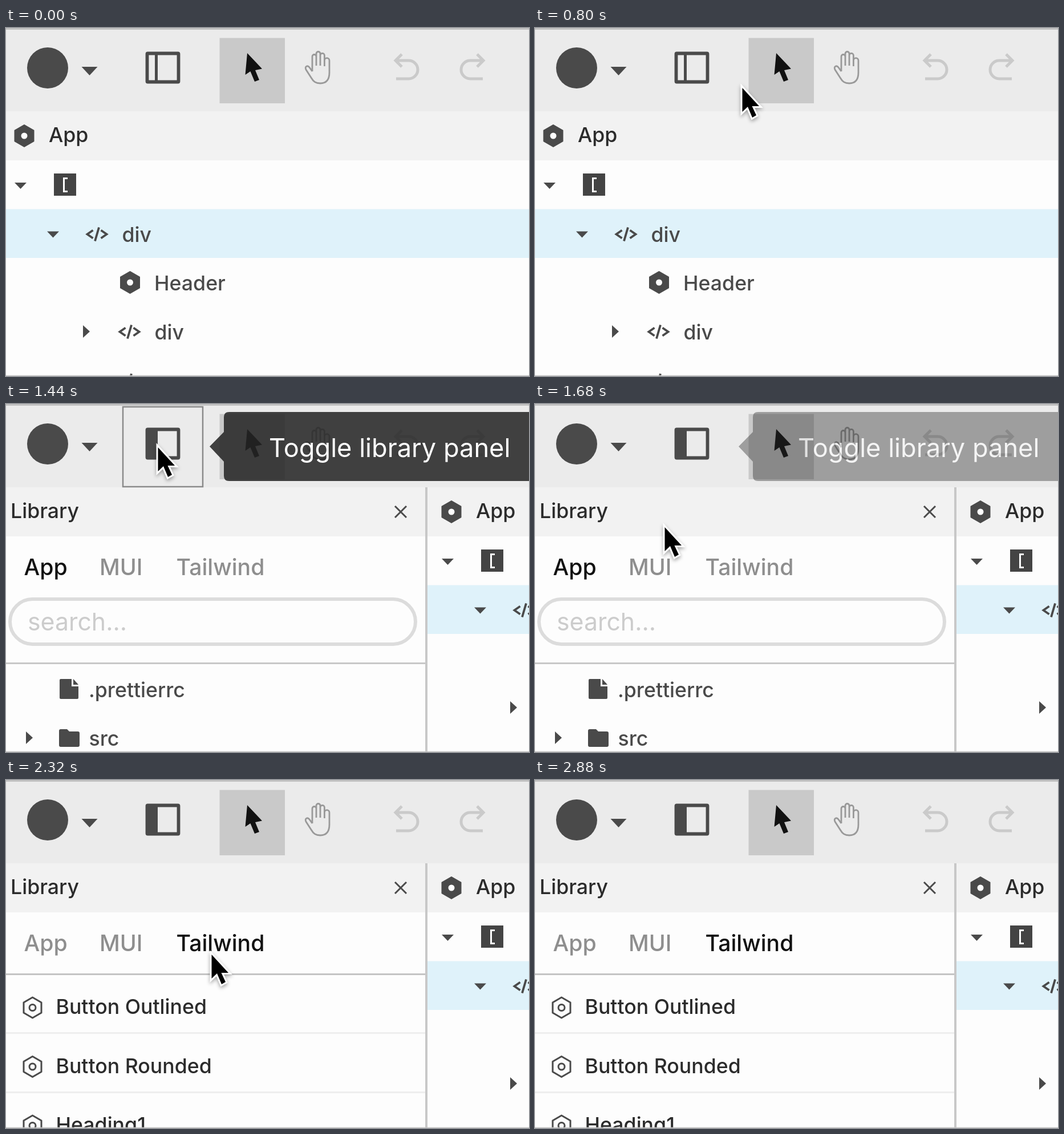
Animation of 917 by 610 pixels, one loop 3040 ms. Source, as an HTML page:

```html
<!DOCTYPE html>
<html lang="en">
<head>
<meta charset="utf-8">
<title>Library panel</title>
<style>
  html, body { margin: 0; width: 100%; height: 100%; overflow: hidden; background: #fdfdfd; }
  svg { display: block; width: 917px; height: 610px; }
  text { font: 500 35.67px Inter, sans-serif; fill: #2b2b2b; }
  .node { fill: #4a4a4a; }
  .tab { font-size: 39.2px; fill: #8e8e8e; }
  .tab.hover { fill: #444; }
  .tab.active { fill: #111; }
  .search { font-size: 42.8px; font-weight: 400; fill: #ccc; }
  .tip { font-size: 45.2px; font-weight: 400; fill: #fff; }
  .line { fill: none; stroke: #4a4a4a; stroke-width: 3; }
  .history { fill: none; stroke: #cacaca; stroke-width: 5; }
  #cursor { filter: drop-shadow(0 3px 3px rgba(0, 0, 0, .35)); }
</style>
</head>
<body>
<svg viewBox="0 0 917 610" fill="#4a4a4a">
  <defs>
    <g id="component">
      <path d="M0-19L16.5-9.5V9.5L0 19L-16.5 9.5V-9.5Z" stroke="#4a4a4a" stroke-width="2" stroke-linejoin="round"/>
      <circle r="5.5" fill="#fdfdfd"/>
    </g>
    <g id="block" class="line">
      <path d="M0-18L15.5-9V9L0 18L-15.5 9V-9Z" stroke-linejoin="round"/>
      <circle r="5.5"/>
    </g>
    <path id="tag" fill="none" stroke="#4a4a4a" stroke-width="3.8" d="M-7-7L-17 0L-7 7M3.5-12L-3.5 12M7-7L17 0L7 7"/>
    <path id="open" d="M-10.5-5H10.5L0 6Z"/>
    <path id="closed" d="M-5-11V11L7 0Z"/>
    <path id="undo" class="history" d="M694 46L683 57L694 68M683 57H706a16 16 0 0 1 0 32H684"/>
  </defs>

  <rect width="917" height="610" fill="#fdfdfd"/>
  <rect y="146" width="917" height="86" fill="#f2f2f2"/>

  <g id="tree">
    <rect x="-12" y="317.5" width="929" height="85.5" fill="#dff2fa"/>
    <rect id="rowHover" width="917" height="85.5" fill="#ebf2fb"/>
    <use href="#component" x="32" y="189"/>
    <text x="75" y="199.5">App</text>
    <use href="#open" x="25.5" y="276"/>
    <rect x="84" y="255" width="39" height="39" fill="#444"/>
    <path d="M108 263.5H101.5V286.5H108" fill="none" stroke="#fff" stroke-width="3"/>
    <use href="#open" x="82.5" y="361.5"/>
    <use href="#tag" x="159.5" y="361.5"/>
    <text class="node" x="203.5" y="374.5">div</text>
    <use href="#component" x="217.5" y="446"/>
    <text class="node" x="260" y="460">Header</text>
    <use href="#closed" x="140" y="532"/>
    <use href="#tag" x="216.5" y="532.5"/>
    <text class="node" x="260.5" y="546">div</text>
    <use href="#tag" x="216.5" y="618"/>
  </g>

  <g id="panel">
    <rect y="232" width="735" height="378" fill="#fdfdfd"/>
    <rect x="735" y="146" width="4" height="464" fill="#c8c8c8"/>
    <text x="8" y="199.5">Library</text>
    <path class="line" d="M682 179L702 199M702 179L682 199"/>
    <g id="files">
      <rect x="7" y="342" width="711" height="79" rx="39.5" fill="none" stroke="#dcdcdc" stroke-width="6"/>
      <text class="search" x="38" y="397">search...</text>
      <rect y="453" width="735" height="3" fill="#c8c8c8"/>
      <path d="M96 482H115V495H127V515q0 2-2 2H96q-2 0-2-2V484q0-2 2-2ZM118 482L127 492H118Z"/>
      <text class="node" x="145" y="513.5">.prettierrc</text>
      <use href="#closed" x="40" y="585"/>
      <path d="M93 573q0-3 3-3h11l4 4h15q3 0 3 3v21q0 3-3 3H96q-3 0-3-3Z"/>
      <text class="node" x="145.5" y="599">src</text>
    </g>
    <g id="blocks">
      <rect id="blockHover" y="445" width="732" height="101" fill="#ebf2fb"/>
      <path d="M0 443.5H735M0 547.5H735" stroke="#eee" stroke-width="3"/>
      <rect y="339" width="735" height="3" fill="#c4c4c4"/>
      <use href="#block" x="46.5" y="399"/>
      <text x="87.5" y="410">Button Outlined</text>
      <use href="#block" x="46.5" y="502.5"/>
      <text x="87.5" y="513.5">Button Rounded</text>
      <use href="#block" x="46.5" y="606"/>
      <text x="87.5" y="617">Heading1</text>
    </g>
    <text class="tab" x="31.5" y="300">App</text>
    <text class="tab" x="164" y="300">MUI</text>
    <text class="tab" x="298.5" y="300">Tailwind</text>
  </g>

  <rect width="917" height="146" fill="#ebebeb"/>
  <rect width="917" height="3" fill="#c2c2c2"/>
  <circle cx="73" cy="70" r="36"/>
  <path d="M132.5 68H160.5L146.5 83Z"/>
  <rect x="247.5" y="44.5" width="55" height="50" rx="1" fill="none" stroke="#4a4a4a" stroke-width="5.8"/>
  <rect x="261" y="44" width="5" height="52"/>
  <rect id="toggleFill" x="247" y="44" width="19" height="52"/>
  <rect id="toggleHover" x="205" y="5" width="140" height="140" fill="none" stroke="#8a8a8a" stroke-width="2.5"/>
  <rect x="374.5" y="17.5" width="114.5" height="114.5" fill="#c9c9c9"/>
  <path d="M423 44L419.5 82L428.5 76L436 94L444 91L437 74L449 71.5Z" fill="#111"/>
  <path d="M537 76V50a3.5 3.5 0 0 1 7 0V66M544 50V45a3.5 3.5 0 0 1 7 0V66M551 48a3.7 3.7 0 0 1 7.4 0V67M558.4 57a4.3 4.3 0 0 1 8.6 0V78C567 91 561 97 551 97C543 97 539 94 535 87L526 73C523 67 529 65 532 69L537 76"
    fill="none" stroke="#999" stroke-width="2.8"/>
  <use href="#undo"/>
  <use href="#undo" transform="translate(1520) scale(-1 1)"/>

  <g id="tooltip">
    <path d="M930 14H391q-9 0-9 9V49L357 74.5L382 101V126q0 9 9 9H930Z" fill="#252525" fill-opacity=".86"/>
    <text class="tip" x="461" y="93">Toggle library panel</text>
  </g>
  <rect y="608.7" width="917" height="1.3" fill="#c4c4c4"/>
  <path id="cursor" d="M2.5 6V48L12 39L20 58L27 54L19.5 38H32Z" fill="#000" stroke="#fff" stroke-width="6" paint-order="stroke"/>
</svg>
<script>
const LOOP = 3040;
const byId = id => document.getElementById(id);
const show = (id, on) => { byId(id).style.display = on ? '' : 'none'; };
const tabs = document.querySelectorAll('.tab');

// Time, x and y of each pointer position; it is sampled, not interpolated.
const pointer = [
  [640, 503, 462], [720, 430, 275], [800, 361, 99], [880, 300, 84],
  [960, 272, 74], [1040, 264, 70], [1520, 258, 84], [1600, 245, 125],
  [1680, 225, 210], [1760, 222, 288], [1840, 336, 300], [1920, 348, 300],
  [2000, 358, 300], [2720, 372, 312], [2800, 420, 470]
];
const tooltipFade = [[0, 0], [1360, .45], [1440, 1], [1680, .45], [1760, 0]];
const latest = (keys, t) => keys.filter(key => key[0] <= t).pop();

function draw(t) {
  const within = (from, to) => t >= from && t < to;
  const opened = t >= 1200;
  const switched = t >= 2320;

  byId('tree').setAttribute('transform', `translate(${opened ? 749 : 0})`);
  show('panel', opened);
  show('files', !switched);
  show('blocks', switched);
  show('toggleFill', opened);
  show('toggleHover', within(880, 1680));
  show('rowHover', within(640, 800));
  byId('rowHover').setAttribute('y', t < 720 ? 574.5 : 403);
  show('blockHover', within(2800, 2880));
  byId('tooltip').style.opacity = latest(tooltipFade, t)[1];

  const active = switched ? 2 : 0;
  const hovered = within(1760, 1840) ? 1 : within(1840, 2320) ? 2 : -1;
  tabs.forEach((tab, i) => {
    tab.classList.toggle('active', i === active);
    tab.classList.toggle('hover', i === hovered);
  });

  show('cursor', within(640, 2880));
  const [, x, y] = latest(pointer, t) || pointer[0];
  byId('cursor').setAttribute('transform', `translate(${x} ${y})`);
}

const start = performance.now();
function tick() {
  draw((performance.now() - start) % LOOP);
  requestAnimationFrame(tick);
}
tick();
</script>
</body>
</html>
```
